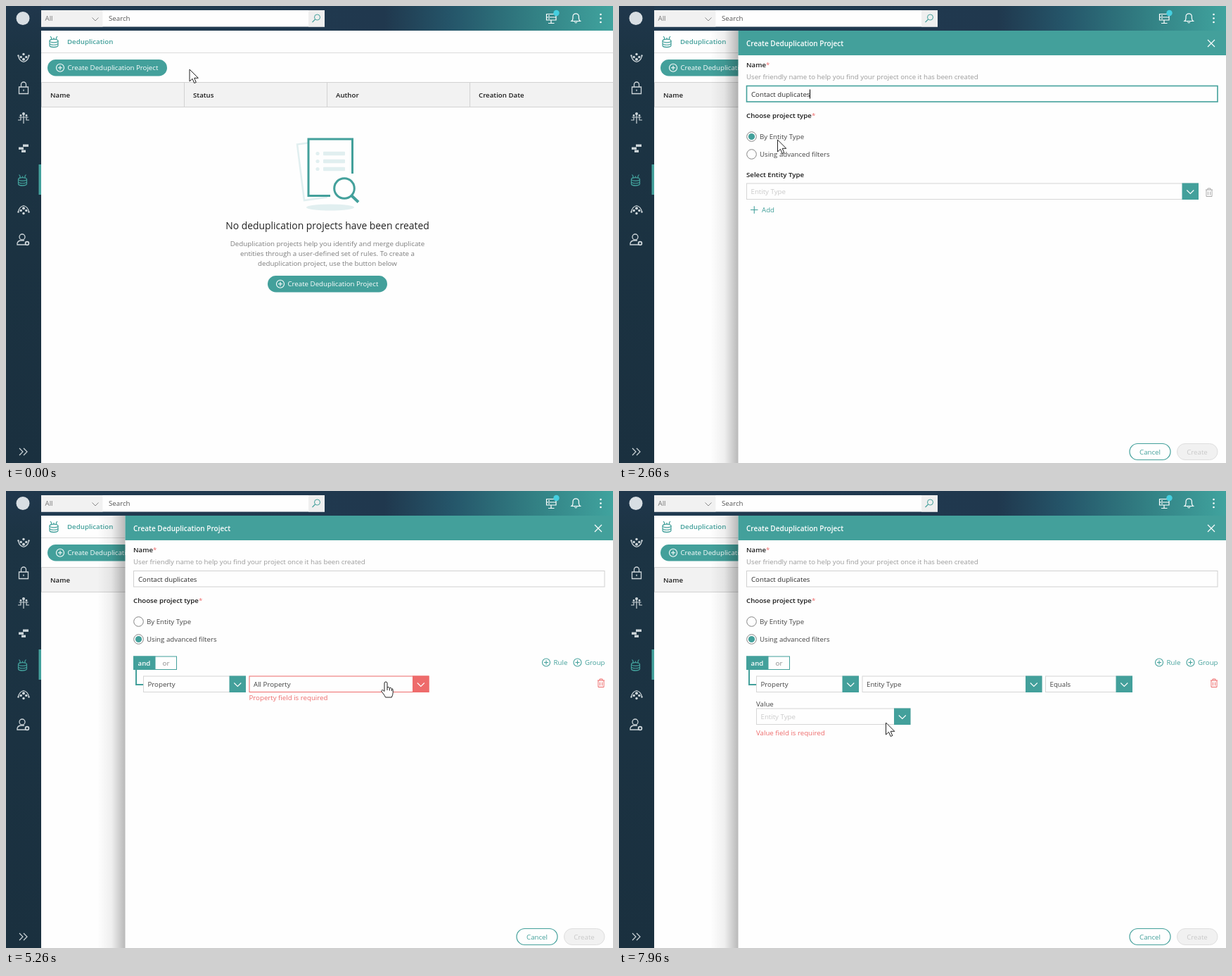
Write an HTML page that moves like this. It is 863 px wide and 649 px high and loops after 8 s.

```html
<!DOCTYPE html>
<html lang="en">
<head>
<meta charset="utf-8">
<title>Deduplication</title>
<style>
html, body { margin: 0; width: 100%; height: 100%; overflow: hidden; background: #fefefe; }
svg { display: block; }
text { font: 9.7px "Open Sans", "Noto Sans", sans-serif; white-space: pre; }
.b { font-weight: 600; }
.mid { text-anchor: middle; }
</style>
</head>
<body>
<svg id="stage" width="100%" height="100%" viewBox="0 0 863 649"></svg>
<script>
const LOOP = 8000, TEAL = '#43a09b', RED = '#ee6b6b', INK = '#2b2b2b', PALE = '#c9c9c9', PAGE = '#fefefe';
const stage = document.getElementById('stage');

const text = (x, y, s, fill = INK, cls = '', size = 9.7) =>
  `<text x="${x}" y="${y}" fill="${fill}" class="${cls}" style="font-size:${size}px">${s}</text>`;
const rect = (x, y, w, h, fill, more = '') =>
  `<rect x="${x}" y="${y}" width="${w}" height="${h}" fill="${fill}" ${more}/>`;
const line = (d, stroke, w = 1, more = '') =>
  `<path d="${d}" fill="none" stroke="${stroke}" stroke-width="${w}" ${more}/>`;
const dot = (x, y, r, fill, more = '') => `<circle cx="${x}" cy="${y}" r="${r}" fill="${fill}" ${more}/>`;
const ring = (x, y, r, stroke, w = 1) => dot(x, y, r, 'none', `stroke="${stroke}" stroke-width="${w}"`);
const at = (x, y, s) => `<g transform="translate(${x} ${y})">${s}</g>`;
const chevron = (x, y, up, c = '#fff') => line(`M${x - 5} ${y + (up ? 2.5 : -2.5)}l5 ${up ? -5 : 5}l5 ${up ? 5 : -5}`, c, 1.1);
const plus = (x, y, c) => ring(x, y, 5.5, c, 1.1) + line(`M${x - 3} ${y}h6M${x} ${y - 3}v6`, c, 1.1);
const trash = (x, y, c) => line(`M${x - 5} ${y - 4}h10M${x - 2} ${y - 4}v-2h4v2M${x - 4} ${y - 4}v9.5h8v-9.5M${x - 1.5} ${y - 1.5}v5M${x + 1.5} ${y - 1.5}v5`, c, 1);

const barrel = (x, y, c) => at(x, y, line(
  'M-6-1v6.5c0 3.6 12 3.6 12 0V-1M-6 2.2c0 3.4 12 3.4 12 0M-6 5.2c0 3.4 12 3.4 12 0' +
  'M-3.5-2.5v-3l-1.5-2M3.5-2.5v-3l1.5-2M0-3v-2.5', c, 1.2) +
  `<ellipse cy="-1" rx="6" ry="2.3" fill="none" stroke="${c}" stroke-width="1.2"/>`);

const createButton = (x, y, fill = TEAL) =>
  rect(x, y, 170, 23.5, fill, 'rx="11.7"') + plus(x + 18, y + 11.8, '#fff') +
  text(x + 28.5, y + 15.3, 'Create Deduplication Project', '#fff');

function sidebar() {
  const c = '#ced6da', fan = s =>
    line(`M-7.5 ${-2 * s}Q-6 ${5 * s} 0 ${6.5 * s}Q6 ${5 * s} 7.5 ${-2 * s}`, c, 1.2) +
    dot(0, -4.5 * s, 1.7, c) + dot(-3.8, -.5 * s, 1.7, c) + dot(3.8, -.5 * s, 1.7, c) +
    dot(0, 2.8 * s, 2, c) + dot(-7.5, -2.5 * s, 1.2, c) + dot(7.5, -2.5 * s, 1.2, c);
  return rect(0, 0, 50, 649, 'url(#side)') + dot(24, 17.5, 9.5, '#d8dee3') +
    at(25, 73, fan(1)) +
    at(25, 117, line('M-6.5-2h13v9.5h-13zM-3.5-2v-3.5a3.5 3.5 0 0 1 7 0V-2M0 1.5v2.5', c, 1.3)) +
    at(25, 159, line('M0-6v14M-6.5-1h13M-8 3h4v-4M8 3h-4v-4', c, 1.2) + dot(0, -6, 2, c) + dot(-4, -3.5, 1.4, c) + dot(4, -3.5, 1.4, c)) +
    at(25, 202, rect(-1, -5.5, 8, 3.4, c) + rect(-7, -1.5, 7, 3.4, c) + rect(-3, 2.5, 6, 3.4, c)) +
    barrel(23.5, 247, TEAL) + rect(46.5, 225, 3.5, 43, TEAL) +
    at(25, 290, fan(-1)) +
    at(24, 332, ring(-1, -4, 4, c, 1.3) + line('M4 7h-12v-2q1-4 6-4h4', c, 1.3) + ring(6, 5, 2.4, c, 1.8)) +
    line('M19 628l5 5-5 5M25 628l5 5-5 5', c, 1.2);
}

function topBar() {
  return rect(50, 0, 813, 35, 'url(#top)') + rect(50, 6, 403, 23.5, PAGE) + rect(50, 6, 87.5, 23.5, '#f1f1f1') +
    text(55.5, 21, 'All', '#777') + line('M122.5 16.5l4.5 4.5 4.5-4.5', '#888') +
    text(146, 21.2, 'Search', '#555') + rect(430, 6, 23, 23.5, '#efefef') +
    ring(442.5, 16, 4, TEAL) + line('M439.5 19l-4 4', TEAL, 1.1) +
    line('M768.5 11.5h13.5v4.5h-13.5zM768.5 16v4h13.5v-4M775 20v4.5M771 24.5h8.5M771 13.8h2M771 18h2', '#fff', 1.2) +
    dot(782.5, 10, 4.2, '#45cfe0') +
    line('M804 21.5q2-1.5 2-4v-2.5a4.2 4.2 0 0 1 8.400 0v2.500q0 2.500 2 4zM808.500 22.500q1.700 3 3.400 0', '#fff', 1.2) +
    [12, 17.5, 23].map(y => dot(845.5, y, 1.3, '#fff')).join('');
}

function page() {
  const heads = ['Name', 'Status', 'Author', 'Creation Date'];
  const soft = '#e1eff0';
  return rect(50, 35, 813, 614, PAGE) + barrel(68, 50.5, TEAL) + text(87, 54, 'Deduplication', TEAL, 'b') +
    line('M50 66.500H863', '#dcdcdc') +
    '<g id="mainButton">' + createButton(59, 76) + '</g>' +
    rect(50, 108, 813, 36, '#f2f2f2') + line('M863 108.500H50.500V143.500H863', '#d2d2d2') +
    heads.map((s, i) => text(63 + 203 * i, 130, s, '#1c1c1c', 'b') +
      (i ? line(`M${50.5 + 203 * i} 108v35.500`, '#d2d2d2') : '')).join('') +
    `<ellipse cx="461" cy="286" rx="34" ry="4.500" fill="${soft}"/>` +
    line('M429 194.500l-15 2 10 79.500 33-4.500', soft, 2.5) +
    line('M461 269.500h-31v-80.500h62.500v49', TEAL, 3) +
    [209.5, 220.500, 231.500].map(y => dot(443, y, 2.6, soft) + rect(451, y - 2.7, 31, 5.4, soft, 'rx="1"')).join('') +
    ring(481, 259, 14.300, TEAL, 3) + line('M491.500 269.500l9.500 9', TEAL, 4) +
    text(457, 316.500, 'No deduplication projects have been created', '#222', 'mid', 13.9) +
    ['Deduplication projects help you identify and merge duplicate',
     'entities through a user-defined set of rules. To create a',
     'deduplication project, use the button below'
    ].map((s, i) => text(457, 340.800 + 14 * i, s, '#7d7d7d', 'mid', 9.75)).join('') +
    createButton(372, 383);
}

function select(x, y, w, label, { red = false, hint = false, up = false, caret = false } = {}) {
  const c = red ? RED : TEAL;
  return rect(x + .5, y + .5, w - 1, 22.500, PAGE, `stroke="${red ? RED : '#d6d6d6'}"`) +
    rect(x + w - 23.500, y, 23.500, 23.500, c) + chevron(x + w - 11.700, y + 12.500, up) +
    text(x + 6.500, y + 15.800, label, hint ? PALE : '#444') +
    (caret ? line(`M${x + 6.500} ${y + 5.500}v13`, '#000') : '');
}

const ROW = 25.6;
function list(x, w, h, items, { scroll = 0, hover = -1, thumb = null, drag = false } = {}) {
  const rows = items.map((s, i) => {
    const y = ROW * i - scroll;
    return (i === hover ? rect(0, y, w, ROW, '#eaf3f3') : '') + text(6, y + 16.700, s, '#444');
  }).join('');
  const bar = thumb === null ? '' : rect(w - 13, 0, 12, h, '#f1f1f1') +
    rect(w - 12, thumb, 10.500, 76, drag ? '#787878' : '#c1c1c1') +
    `<path d="M${w - 9.500} 9h6l-3-3zM${w - 9.500} ${h - 9}h6l-3 3z" fill="#333"/>`;
  return rect(x, 286, w, h, PAGE, 'filter="url(#drop)"') +
    `<svg x="${x}" y="286" width="${w}" height="${h}">${rows}${bar}</svg>` +
    rect(x + .5, 286.500, w - 1, h - 1, 'none', 'stroke="#d9d9d9"');
}

const radio = (y, on, label) =>
  dot(188.500, y, 6.800, PAGE, 'stroke="#858585"') + (on ? dot(188.500, y, 4.600, TEAL) : '') + text(200, y + 3.700, label, '#444');
const label = (y, s, star) => text(181, y, s + (star ? `<tspan fill="${RED}" font-weight="400">*</tspan>` : ''), '#1c1c1c', 'b');

const dialog = () =>
  rect(130, 35, 40, 614, 'url(#shade)') + rect(169.500, 35, 693.500, 614, PAGE) + rect(169.500, 35, 693.500, 35, TEAL) +
  text(181, 57, 'Create Deduplication Project', '#fff', 'b', 10) + line('M837 48l10 10M847 48l-10 10', '#fff', 1.2) +
  label(87, 'Name', true) + text(181, 104, 'User friendly name to help you find your project once it has been created', '#9b9b9b') +
  label(159, 'Choose project type', true) +
  rect(726, 621.500, 58, 23, PAGE, `rx="11.500" stroke="${TEAL}" stroke-width="1.2"`) + text(755, 636.700, 'Cancel', TEAL, 'mid') +
  rect(793.500, 621.500, 57.500, 23, '#f1f1f1', 'rx="11.500" stroke="#dedede"') + text(822, 636.700, 'Create', PALE, 'mid') +
  '<g id="form"></g>';

stage.innerHTML = `<defs>
<linearGradient id="top"><stop offset="0" stop-color="#203a50"/><stop offset=".6" stop-color="#20384e"/>
<stop offset=".72" stop-color="#25566a"/><stop offset=".87" stop-color="#338285"/><stop offset="1" stop-color="#40a39e"/></linearGradient>
<linearGradient id="side" x2="0" y2="1"><stop offset="0" stop-color="#20374c"/><stop offset=".1" stop-color="#1c3444"/><stop offset="1" stop-color="#1a303f"/></linearGradient>
<linearGradient id="shade"><stop offset="0" stop-opacity="0"/><stop offset=".5" stop-opacity=".06"/><stop offset="1" stop-opacity=".28"/></linearGradient>
<filter id="drop" x="-10%" y="-10%" width="120%" height="125%"><feDropShadow dx="0" dy="1.500" stdDeviation="2" flood-opacity=".25"/></filter>
</defs>${page()}<g id="dialog">${dialog()}</g>${sidebar()}${topBar()}
<g id="popup"></g><g id="arrow">
<path d="M0 0V17L4 13.300 6.700 19.500 9.300 18.400 6.700 12.300H12.300Z" fill="#fff" stroke="#222" stroke-linejoin="round"/></g>
<g id="hand"><path d="M-2 11.500V2Q-2 0 0 0T2 2V8Q4.500 6.500 5.500 8.700 7.500 7.500 8.500 9.600 10.500 9 10.500 11.500V15.500Q10.500 18 8.500 22H0Q-1-19.900 0 0" fill="none"/>
<path d="M-2 12V2Q-2 0 0 0T2 2V8Q4.400 6.500 5.400 8.700 7.500 7.600 8.400 9.800 10.200 9.500 10.200 11.700V15.500Q10 18.500 8.300 22H-.5Q-1.500 19.500-3.500 17T-6.500 12.800Q-5.500 10.600-3.300 12.300L-2 13.500Z" fill="#fff" stroke="#222" stroke-linejoin="round"/>
<path d="M2 8v4M5.400 9v3.500M8.400 10v3" stroke="#222" fill="none"/></g>`;

const $ = Object.fromEntries([...stage.querySelectorAll('g[id]')].map(g => [g.id, g]));
const clamp = v => Math.max(0, Math.min(1, v));
const smooth = v => v * v * (3 - 2 * v);
const span = (t, a, b) => clamp((t - a) / (b - a));
const within = (t, a, b) => t >= a && t < b;

const NAME = 'Contact duplicates';
const SAVED = ['Customer duplicates', 'Training', 'Fix country name', 'Replace value', 'Fix industries', NAME];
const KINDS = ['Property', 'Vocabulary', 'Entity'];
const PROPS = ['All Property', 'Aliases', 'Codes', 'Created Date', 'Description', 'Discovery Date', 'Display Name',
  'Document Mime Type', 'Encoding', 'Entity Codes', 'Entity Type', 'Last Changed By', 'Modified Date', 'Name', 'Origin',
  'Preview Image', 'Provider', 'Revision', 'Sort Date', 'Tags', 'Uri', 'Version'];
const OPS = ['Equals', 'Not Equals', 'Contains', 'Not Contains', 'Begins With', 'Ends With', 'Exists', 'In', 'Is Null', 'Between'];

// Pointer stops: time, x, y
const PATH = [[130, 261, 90], [330, 204, 88.5], [2300, 204, 88.5], [2660, 225.5, 190], [2950, 190, 208], [3430, 190, 208],
  [3900, 240.500, 266], [4400, 240.500, 266], [4650, 232, 298], [4780, 232, 298], [5130, 540, 271], [5300, 540, 271],
  [5560, 594, 321], [5620, 594, 321], [6000, 593, 354], [6100, 593, 354], [6360, 420, 456], [6480, 420, 456],
  [6800, 603.500, 313.500], [6900, 655, 274], [7080, 655, 274], [7300, 640, 300], [7500, 640, 300], [7860, 492, 346], [7960, 379.500, 329]];
const HAND = [[230, 2380], [2860, 3520], [3800, 5400], [6200, 6560], [6860, 7580]];

function pointer(t) {
  let i = PATH.findIndex(p => p[0] > t);
  if (i === 0) return PATH[0].slice(1);
  if (i < 0) return PATH[PATH.length - 1].slice(1);
  const [a, b] = [PATH[i - 1], PATH[i]];
  let k = span(t, a[0], b[0]);
  if (b[0] === 7860) k = k * k;
  else if (b[0] !== 7960) k = smooth(k);
  return [a[1] + (b[1] - a[1]) * k, a[2] + (b[2] - a[2]) * k];
}

// Typing comes in two bursts
const keyTime = i => i < 12 ? 1130 + 72.7 * i : 1960 + 40 * (i - 12);

function nameField(t, typed) {
  const focus = within(t, 640, 3030);
  const last = typed ? keyTime(typed - 1) : 640;
  const caret = focus && (t - last) % 1060 < 530;
  return rect(181.500, 113.500, 669.500, 22.500, PAGE, `stroke="${focus ? TEAL : '#d0d0d0'}" stroke-width="${focus ? 1.6 : 1}"`) +
    `<g id="typed">${text(188, 128.800, NAME.slice(0, typed))}</g>` +
    (caret ? '<path id="caret" d="M.5 118.500v13" stroke="#000"/>' : '');
}

function entityPart(t) {
  return label(243, 'Select Entity Type') + select(181, 251.500, 643, 'Entity Type', { hint: true }) +
    (t < 900 ? `<circle cx="788.500" cy="263.500" r="6" fill="none" stroke="${TEAL}" stroke-width="1.300" stroke-dasharray="2.600 1 24 40" transform="rotate(${(t - 730) * .36} 788.500 263.500)"/>` : '') +
    trash(839, 265, '#a9a9a9') + line('M187 289.500h10.500M192.250 284.200v10.500', TEAL, 1.1) + text(203, 293, 'Add', TEAL);
}

function filterPart(t) {
  const kind = t >= 4740, prop = t >= 6460, op = t >= 7480;
  let s = rect(181.500, 235, 61, 18.500, PAGE, `stroke="${TEAL}"`) + rect(181, 234.500, 31.500, 19.500, TEAL) +
    text(196.500, 247.500, 'and', '#fff', 'b mid') + text(227.500, 247.500, 'or', '#8a8a8a', 'mid') +
    plus(768, 243.500, TEAL) + text(778.500, 247.200, 'Rule', TEAL) + plus(812.500, 243.500, TEAL) + text(823, 247.200, 'Group', TEAL) +
    trash(846, 273, RED) + line('M185 254v21h10', TEAL, 2);
  const need = (x, y, what) => text(x, y, what + ' field is required', RED);

  const first = within(t, 4400, 4740);
  s += select(195, 262.500, 146, kind ? 'Property' : 'Select Property Type', { red: !kind && t >= 3460, hint: !kind, up: first });
  if (within(t, 3460, 4400)) s += need(195, 296.800, 'Property type');

  if (kind) {
    const open = within(t, 5320, 6460);
    s += select(345.500, 262.500, 256, prop ? 'Entity Type' : 'All Property', { red: !prop, up: open, caret: open });
    if (t < 5320) s += need(345.500, 296.800, 'Property');
    if (open) {
      const k = smooth(span(t, 5620, 6000));
      s += list(345.500, 256, 219.500, PROPS, { scroll: 96.200 * k, thumb: 12 + 33 * k, drag: within(t, 5600, 6100), hover: t > 6300 ? 10 : -1 });
    }
  }
  if (prop) {
    const open = within(t, 7110, 7480);
    s += select(606, 262.500, 124, op ? 'Equals' : 'Choose Operation', { red: !op, hint: !op, up: open });
    if (!op && !open) s += need(606, 296.800, 'Operator');
    if (open) s += list(606, 124, 219.500, OPS, { thumb: 12, hover: t > 7200 ? 0 : -1 });
  }
  if (op) s += text(195, 305.500, 'Value', '#444') + select(195, 308.500, 219.500, 'Entity Type', { hint: true }) + need(195, 347.300, 'Value');
  if (first) s += list(195, 146, 78, KINDS, { hover: t > 4520 ? 0 : -1 });
  return `<g opacity="${span(t, 3030, 3130)}">${s}</g>`;
}

function suggestions(t, typed) {
  if (!within(t, 690, 2160)) return '';
  const items = SAVED.filter(s => s.startsWith(NAME.slice(0, typed)));
  const x = typed === 0 ? 263 : items.length > 1 ? 306 : 254, w = items.length > 1 ? 132 : 124;
  return rect(x, 142, w, 6.500 + 26.300 * items.length, PAGE, 'rx="4" filter="url(#drop)"') +
    (typed ? '' : `<path d="M271 142.500l8-6 8 6" fill="${PAGE}"/>`) +
    items.map((s, i) => text(x + 9, 161.700 + 26.300 * i, s, '#1c1c1c')).join('');
}

function setHTML(g, html) {
  if (g.lastHTML !== html) g.innerHTML = g.lastHTML = html;
}

function draw(t) {
  let typed = 0;
  while (typed < NAME.length && t >= keyTime(typed)) typed++;

  const slide = 1 - (1 - span(t, 360, 600)) ** 3;
  $.dialog.setAttribute('transform', `translate(${735 * (1 - slide)} 0)`);
  $.dialog.style.display = t < 360 ? 'none' : '';
  setHTML($.mainButton, createButton(59, 76, within(t, 230, 500) ? '#36857f' : TEAL));

  const advanced = t >= 3030;
  setHTML($.form, nameField(t, typed) + radio(185.500, !advanced, 'By Entity Type') +
    radio(210.500, advanced, 'Using advanced filters') + (advanced ? filterPart(t) : entityPart(t)));
  const caret = document.getElementById('caret');
  if (caret) {
    const w = typed ? document.querySelector('#typed text').getComputedTextLength() : 0;
    caret.setAttribute('transform', `translate(${Math.round(188 + w)} 0)`);
  }
  setHTML($.popup, suggestions(t, typed));

  const [x, y] = pointer(t), hand = HAND.some(([a, b]) => within(t, a, b));
  for (const [g, on] of [[$.arrow, !hand], [$.hand, hand]]) {
    g.style.display = on ? '' : 'none';
    g.setAttribute('transform', `translate(${x} ${y})`);
  }
}

const start = performance.now();
function tick() {
  draw((performance.now() - start) % LOOP);
  requestAnimationFrame(tick);
}
draw(0);
requestAnimationFrame(tick);
</script>
</body>
</html>
```
